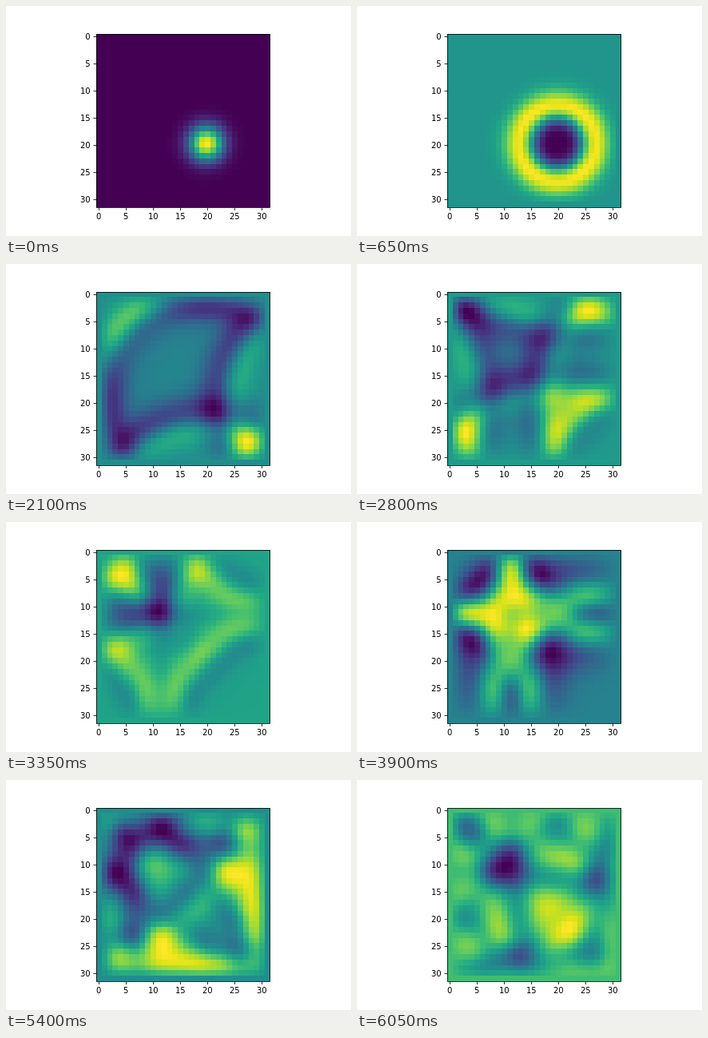
An HTML page with a canvas that plays this animation: 432x288 px, repeating every 6.1 s.

```html
<!DOCTYPE html>
<html lang="en">
<head>
<meta charset="utf-8">
<title>Wave equation on a square</title>
<style>
html, body { margin: 0; width: 100%; height: 100%; overflow: hidden; background: #fff; }
canvas { display: block; }
</style>
</head>
<body>
<canvas id="stage" width="432" height="288"></canvas>
<script>
const ctx = document.getElementById('stage').getContext('2d');
const N = 32, STEPS = 122, STEP_MS = 50;
const DX = Math.PI / (N - 1), DT = 0.05;
const COURANT2 = (DT / DX) ** 2;

// Viridis, sampled at even intervals
const viridis = ['440154', '48186a', '472d7b', '424086', '3b528b', '33638d', '2c728e', '26828e', '21918c',
  '1fa088', '28ae80', '3fbc73', '5ec962', '84d44b', 'addc30', 'd8e219', 'ffe726']
  .map(hex => [0, 2, 4].map(i => parseInt(hex.slice(i, i + 2), 16)));

function color(v) {
  const pos = Math.min(255, Math.floor(v * 256)) / 16;
  const i = Math.floor(pos), f = pos - i;
  const rgb = viridis[i].map((a, c) => Math.round(a + (viridis[i + 1][c] - a) * f));
  return `rgb(${rgb})`;
}

// Leapfrog solution: Gaussian bump at rest, edges held at zero
function solve() {
  const start = new Float64Array(N * N);
  for (let r = 1; r < N - 1; r++) {
    for (let c = 1; c < N - 1; c++) {
      start[r * N + c] = Math.exp(-10 * ((r * DX - 2) ** 2 + (c * DX - 2) ** 2));
    }
  }
  const fields = [start, start];
  while (fields.length < STEPS) {
    const [prev, u] = fields.slice(-2);
    const next = new Float64Array(N * N);
    for (let r = 1; r < N - 1; r++) {
      for (let c = 1; c < N - 1; c++) {
        const i = r * N + c;
        const laplacian = u[i - 1] + u[i + 1] + u[i - N] + u[i + N] - 4 * u[i];
        next[i] = 2 * u[i] - prev[i] + COURANT2 * laplacian;
      }
    }
    fields.push(next);
  }
  return fields;
}

const fields = solve();
const edgeX = i => Math.round(113 + 6.81 * i);
const edgeY = i => Math.round(34.56 + 6.795 * i);

function drawField(u) {
  const lo = Math.min(...u), hi = Math.max(...u);
  for (let r = 0; r < N; r++) {
    for (let c = 0; c < N; c++) {
      const x = edgeX(c), y = edgeY(r);
      ctx.fillStyle = color((u[r * N + c] - lo) / (hi - lo));
      ctx.fillRect(x, y, edgeX(c + 1) - x, edgeY(r + 1) - y);
    }
  }
}

function drawAxes() {
  ctx.strokeStyle = ctx.fillStyle = '#000';
  ctx.lineWidth = 0.8;
  ctx.strokeRect(113.5, 35.5, 217, 217);
  ctx.font = '10px "DejaVu Sans", sans-serif';
  for (let n = 0; n <= 30; n += 5) {
    const x = Math.round(112.68 + (n + 0.5) * 6.795);
    const y = Math.round(34.56 + (n + 0.5) * 6.795);
    ctx.fillRect(x + 0.1, 252.5, 0.8, 3.5);
    ctx.fillRect(109.5, y + 0.1, 3.5, 0.8);
    ctx.textAlign = 'center';
    ctx.fillText(n, x + 0.3, 267);
    ctx.textAlign = 'right';
    ctx.fillText(n, 105.7, y + 4);
  }
}

let shown = -1;
function tick() {
  const k = Math.floor(performance.now() / STEP_MS) % STEPS;
  if (k !== shown) {
    shown = k;
    ctx.fillStyle = '#fff';
    ctx.fillRect(0, 0, 432, 288);
    drawField(fields[k]);
    drawAxes();
  }
  requestAnimationFrame(tick);
}
tick();
</script>
</body>
</html>
```
